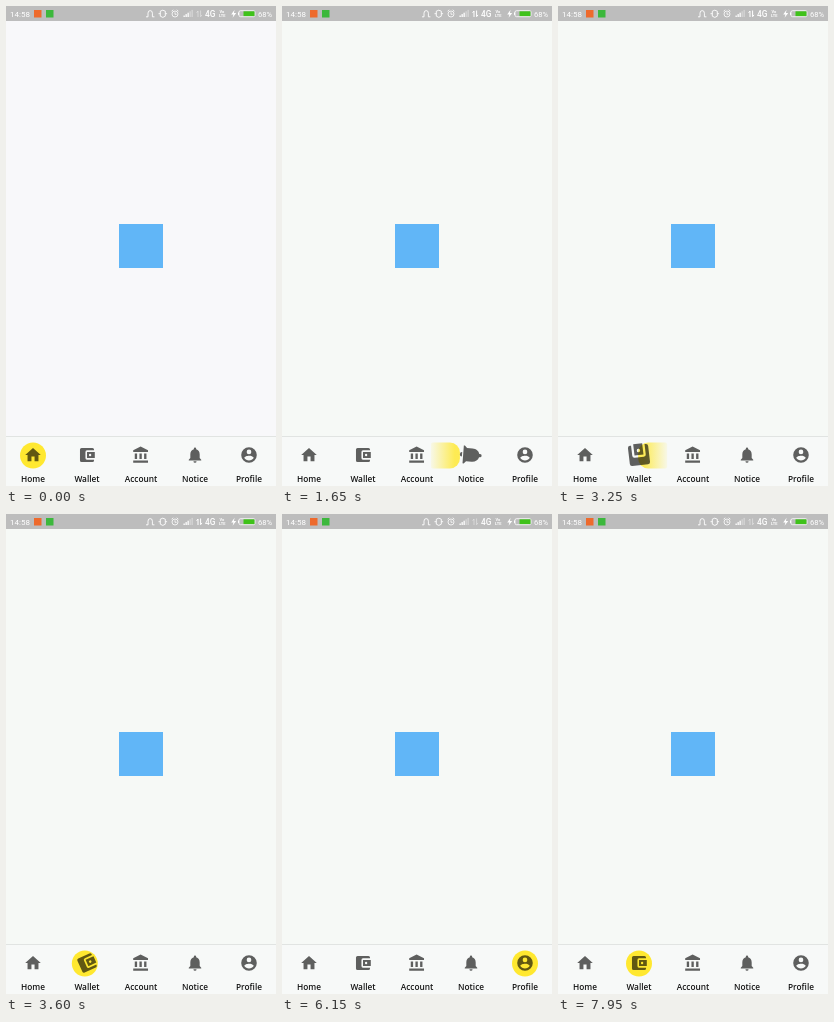
An HTML page with a canvas that plays this animation: 270x480 px, repeating every 8000 ms.

```html
<!DOCTYPE html>
<html lang="en">
<head>
<meta charset="utf-8">
<title>Rolling navigation bar</title>
<style>
html, body { margin: 0; width: 100%; height: 100%; overflow: hidden; background: #f6f9f6; }
canvas { display: block; width: 100vw; height: 100vh; }
</style>
</head>
<body>
<canvas id="stage"></canvas>
<script>
const W = 270, H = 480, LOOP = 8000;
const canvas = document.getElementById('stage');
const ctx = canvas.getContext('2d');
const ratio = Math.max(1, window.devicePixelRatio || 1);
canvas.width = W * ratio;
canvas.height = H * ratio;

const ICON_Y = 449.5, BALL_R = 13, YELLOW = '255,232,48';

// Icon outlines on a 24 unit grid
const tabs = [
  ['Home', 'M10 20v-6h4v6h5v-8h3L12 3 2 12h3v8z'],
  ['Wallet', 'M21 18v1a2 2 0 0 1-2 2H5a2 2 0 0 1-2-2V5a2 2 0 0 1 2-2h14a2 2 0 0 1 2 2v1h-9a2 2 0 0 0-2 2v8a2 2 0 0 0 2 2zM12 16h10V8H12zM16 10.5a1.5 1.5 0 1 0 0 3a1.5 1.5 0 1 0 0-3z'],
  ['Account', 'M4 10v7h3v-7zM10 10v7h3v-7zM2 22h19v-3H2zM16 10v7h3v-7zM11.5 1L2 6v2h19V6z'],
  ['Notice', 'M12 22a2 2 0 0 0 2-2h-4a2 2 0 0 0 2 2zM18 16v-5c0-3.07-1.64-5.64-4.5-6.32V4a1.5 1.5 0 0 0-3 0v.68C7.63 5.36 6 7.92 6 11v5l-2 2v1h16v-1z'],
  ['Profile', 'M12 2a10 10 0 1 0 0 20a10 10 0 1 0 0-20zM12 5a3 3 0 1 1 0 6a3 3 0 1 1 0-6zM12 19.2c-2.5 0-4.71-1.28-6-3.22c.03-1.99 4-3.08 6-3.08s5.97 1.09 6 3.08c-1.29 1.94-3.5 3.22-6 3.22z']
].map(([label, d], i) => ({ label, shape: new Path2D(d), x: 27 + 54 * i }));

const moves = [
  { at: 1445, from: 0, to: 3 },
  { at: 3035, from: 3, to: 1 },
  { at: 4608, from: 1, to: 4 },
  { at: 6880, from: 4, to: 1 }
];
const SETTLE = 850, PULSE = 610;

const clamp = v => Math.min(1, Math.max(0, v));

// Damped spring: share of the way still to go, negative when overshooting
function remaining(s) {
  if (s >= SETTLE) return 0;
  const a = s * 0.0085;
  const swing = Math.exp(-0.676 * a) * (Math.cos(a) + 0.676 * Math.sin(a));
  return swing * (1 - (s / SETTLE) ** 6);
}

function pose(t) {
  const move = moves.filter(m => m.at <= t).pop();
  if (!move) return { x: tabs[0].x, active: 0, pulse: 0, dir: 1, rolling: false };
  const s = t - move.at;
  const from = tabs[move.from].x, to = tabs[move.to].x;
  const left = remaining(s);
  return {
    x: to - (to - from) * left,
    active: move.to,
    pulse: Math.sin(Math.PI * clamp(s / PULSE)),
    dir: Math.sign(to - from),
    rolling: left > 0.015 && s > 0 && s < 300
  };
}

function rect(x, y, w, h, color) {
  ctx.fillStyle = color;
  ctx.fillRect(x, y, w, h);
}

function text(str, x, y, font, color, align = 'left') {
  ctx.font = font;
  ctx.fillStyle = color;
  ctx.textAlign = align;
  ctx.fillText(str, x, y);
}

function stroke(d, width = 0.9) {
  ctx.lineWidth = width;
  ctx.strokeStyle = '#fff';
  ctx.stroke(new Path2D(d));
}

function drawStatus(t) {
  rect(0, 0, W, 15, '#bdbdbd');
  text('14:58', 4, 10.8, '8px Roboto, sans-serif', '#fff');
  rect(28, 4, 7.5, 7.5, '#ee6a2c');
  rect(40, 4, 7.5, 7.5, '#3cb83c');

  stroke('M140 10.8h2v-3.6a2.2 2.6 0 0 1 4.4 0v3.6h2');
  stroke('M154.3 5.2l2.5-1l2.5 1v5l-2.5 1.2l-2.5-1.2zM152.5 7.7h1.8M159.3 7.7h1.8');
  stroke('M172 8a3 3 0 1 1-6 0a3 3 0 1 1 6 0zM169 6.3v2h1.6M165.6 5.2l1.7-1.4M172.4 5.2l-1.7-1.4', 0.8);
  for (let i = 0; i < 5; i++) {
    const h = 1.5 + i * 1.4;
    rect(177.5 + i * 2, 11 - h, 1.3, h, i < 3 ? '#fff' : '#d6d6d6');
  }

  const idle = t < 900 || t >= 5900;
  ctx.globalAlpha = idle ? 0.4 : 1;
  stroke('M192 11v-6l-1.4 1.8M194.6 4.5v6.2l1.4-1.8', 1);
  ctx.globalAlpha = 1;

  text('4G', 199, 10.8, '500 8.3px Roboto, sans-serif', '#fff');
  text('Vo', 213.5, 7.4, 'bold 4px Roboto, sans-serif', '#fff');
  text('LTE', 213, 11.2, 'bold 4px Roboto, sans-serif', '#fff');
  ctx.fillStyle = '#fff';
  ctx.fill(new Path2D('M228.6 3.8l-3.4 4.6h2.2l-.8 3.4l3.6-4.8h-2.3z'));

  ctx.lineWidth = 0.8;
  ctx.strokeStyle = '#fff';
  ctx.beginPath();
  ctx.roundRect(233, 4.7, 16, 6, 1.5);
  ctx.stroke();
  rect(237.5, 5.3, 11, 4.8, '#3fc21a');
  rect(232, 6.5, 1, 2.4, '#fff');
  text('68%', 252, 10.8, '7.6px Roboto, sans-serif', '#fff');
}

function drawBall({ x, dir, rolling, pulse }) {
  ctx.save();
  ctx.translate(x, ICON_Y);
  ctx.scale(dir, 1);
  ctx.beginPath();
  if (rolling) {
    const fade = ctx.createLinearGradient(-16, 0, 8, 0);
    fade.addColorStop(0, `rgba(${YELLOW},.1)`);
    fade.addColorStop(1, `rgba(${YELLOW},1)`);
    ctx.fillStyle = fade;
    ctx.globalAlpha = 1 - 0.2 * pulse;
    ctx.roundRect(-16, -BALL_R, 16 + BALL_R, 2 * BALL_R, [2, 10, 10, 2]);
  } else {
    ctx.fillStyle = `rgb(${YELLOW})`;
    ctx.arc(0, 0, BALL_R, 0, 2 * Math.PI);
  }
  ctx.fill();
  ctx.restore();
}

// The chosen icon swings and swells with the pulse
function drawTab(tab, swing) {
  const size = 0.78 * (1 + 0.5 * Math.abs(swing));
  ctx.save();
  ctx.translate(tab.x, ICON_Y - 0.5);
  ctx.rotate(swing * 108 * Math.PI / 180);
  ctx.scale(size, size);
  ctx.translate(-12, -12);
  ctx.fillStyle = 'rgba(0,0,0,.62)';
  ctx.fill(tab.shape, 'evenodd');
  ctx.restore();
  text(tab.label, tab.x, 475.5, '600 8.3px "Open Sans", sans-serif', '#151515', 'center');
}

function draw(t) {
  ctx.setTransform(ratio, 0, 0, ratio, 0, 0);
  const k = clamp((t - 50) / 850);
  const mix = (a, b) => Math.round(a + (b - a) * k);
  rect(0, 0, W, H, `rgb(${mix(248, 246)},${mix(248, 249)},${mix(250, 246)})`);
  drawStatus(t);
  rect(113, 218, 44, 44, '#61b6f7');

  rect(0, 430, W, 50, '#f7f9f8');
  rect(0, 430, W, 1, '#e1e4e2');
  const p = pose(t);
  drawBall(p);
  tabs.forEach((tab, i) => drawTab(tab, i === p.active ? p.dir * p.pulse : 0));
}

const start = performance.now();
function tick() {
  draw((performance.now() - start) % LOOP);
  requestAnimationFrame(tick);
}
tick();
</script>
</body>
</html>
```
